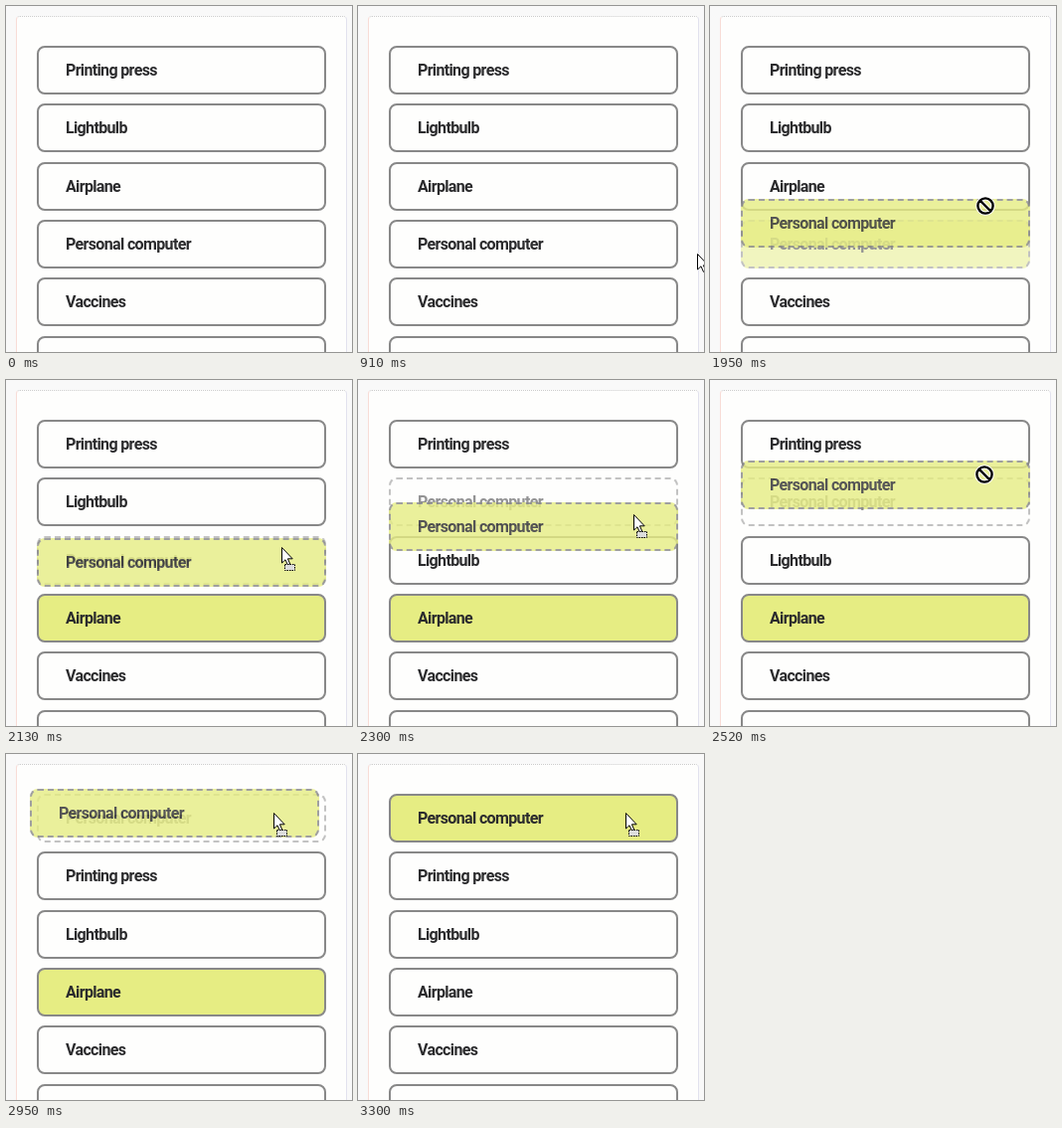
Write an HTML page that moves like this. It is 348 px wide and 348 px high and loops after 4650 ms.

```html
<!DOCTYPE html>
<html lang="en">
<head>
<meta charset="utf-8">
<title>Sortable list</title>
<style>
  html, body { margin: 0; width: 100%; height: 100%; overflow: hidden; background: #f9f9f9; }
  #stage { position: relative; width: 348px; height: 348px; overflow: hidden; }
  #panel {
    position: absolute; left: 10px; top: 10px; width: 331px; height: 360px;
    border: 1px dotted #ccc; border-left: 1px solid #f8dcd6; border-right: 1px solid #e2e2ee;
    border-radius: 4px; background: #fefefd;
  }
  .item {
    position: absolute; left: 31px; width: 291px; height: 49.2px; box-sizing: border-box;
    padding-left: 27px; border: 2px solid #888; border-radius: 8px; background: #fefefd;
    font: bold 16px/45px Roboto, "Liberation Sans", sans-serif; letter-spacing: -.65px;
    color: #2b2b2d; white-space: nowrap;
  }
  .hover { background: #e6ed83; }
  .dragging { border-style: dashed; opacity: .5; }
  #ghost { top: 215px; border-style: dashed; opacity: .8; background: #e6ed83; }
  svg { position: absolute; left: 0; top: 0; overflow: visible; }
</style>
</head>
<body>
<div id="stage">
  <div id="panel"></div>
  <div id="ghost" class="item">Personal computer</div>
  <svg id="cursor" width="1" height="1">
    <g id="arrow">
      <path d="M.5 .5V16L4 12.8L6.5 18.4L8.9 17.4L6.4 11.8H11.2Z" fill="#fff" stroke="#000"/>
      <rect id="parcel" x="3.5" y="17.5" width="10" height="6" fill="#ddd" stroke="#000" stroke-dasharray="1.5 1"/>
    </g>
    <g id="deny" fill="none">
      <path d="M-5.3 -5.3L5.3 5.3M7.6 0A7.6 7.6 0 1 1 -7.6 0A7.6 7.6 0 1 1 7.6 0" stroke="#fff" stroke-width="4.4"/>
      <path d="M-5.3 -5.3L5.3 5.3M7.6 0A7.6 7.6 0 1 1 -7.6 0A7.6 7.6 0 1 1 7.6 0" stroke="#000" stroke-width="2.4"/>
    </g>
  </svg>
</div>
<script>
const LOOP = 4650, START = 910, TICK = 43.3;
const PITCH = 58.3, TOP = 40, DRAGGED = 3;
const names = ['Printing press', 'Lightbulb', 'Airplane', 'Personal computer', 'Vaccines', ''];

// Moments in ticks after the pointer appears
const HOVER = 2, GRAB = 20, DROP = 53, SETTLE = 55;
const SWAPS = [25, 31, 39];
const DENIED = [[23, 24], [30, 30], [37, 38]];

// tick, x, y
const pointerPath = [
  [19, 276, 239], [24, 277, 201], [32, 277, 135],
  [37, 276, 95], [41, 272, 72], [45, 269, 60], [46, 269, 60], [47, 269, 59]
];
const ghostPath = [
  [19, 0, 0], [24, 0, -21], [32, 0, -92],
  [37, 0, -134], [41, -4, -163], [45, -7, -179], [46, -7, -179], [47, -7, -180]
];

const $ = id => document.getElementById(id);
const ghost = $('ghost');
const items = names.map(name => {
  const el = document.createElement('div');
  el.textContent = name;
  $('stage').insertBefore(el, ghost);
  return el;
});

const show = (el, on) => { el.style.display = on ? '' : 'none'; };
const move = (el, [x, y]) => { el.style.transform = `translate(${x}px, ${y}px)`; };

function along(path, n) {
  const i = path.findIndex(p => p[0] >= n);
  if (i < 0) return path[path.length - 1].slice(1);
  if (i === 0) return path[0].slice(1);
  const a = path[i - 1], b = path[i], k = (n - a[0]) / (b[0] - a[0]);
  return [1, 2].map(j => Math.round(a[j] + (b[j] - a[j]) * k));
}

function pointerAt(n) {
  if (n >= 11) return along(pointerPath, n);
  const rest = Math.pow(1 - n / 11, 1.7);
  return [Math.round(276 + 65 * rest), Math.round(239 + 10 * rest)];
}

function draw(t) {
  const n = Math.floor((t - START) / TICK);
  const swaps = SWAPS.filter(s => n >= s).length;
  const held = n >= GRAB && n < DROP;
  const hovered = n < HOVER ? -1 : swaps && n < SETTLE ? 2 : DRAGGED;

  items.forEach((el, i) => {
    let slot = i;
    if (i === DRAGGED) slot -= swaps;
    else if (i < DRAGGED && i >= DRAGGED - swaps) slot++;
    el.style.top = TOP + slot * PITCH + 'px';
    el.className = 'item' + (i === hovered ? ' hover' : '') + (i === DRAGGED && held ? ' dragging' : '');
  });

  show(ghost, held);
  move(ghost, along(ghostPath, n));

  const denied = DENIED.some(([from, to]) => n >= from && n <= to);
  show($('cursor'), n >= 0);
  show($('arrow'), !denied);
  show($('deny'), denied);
  show($('parcel'), n >= GRAB);
  move($('cursor'), pointerAt(Math.max(n, 0)));
}

const begin = performance.now();
function frame() {
  draw((performance.now() - begin) % LOOP);
  requestAnimationFrame(frame);
}
draw(0);
requestAnimationFrame(frame);
</script>
</body>
</html>
```
